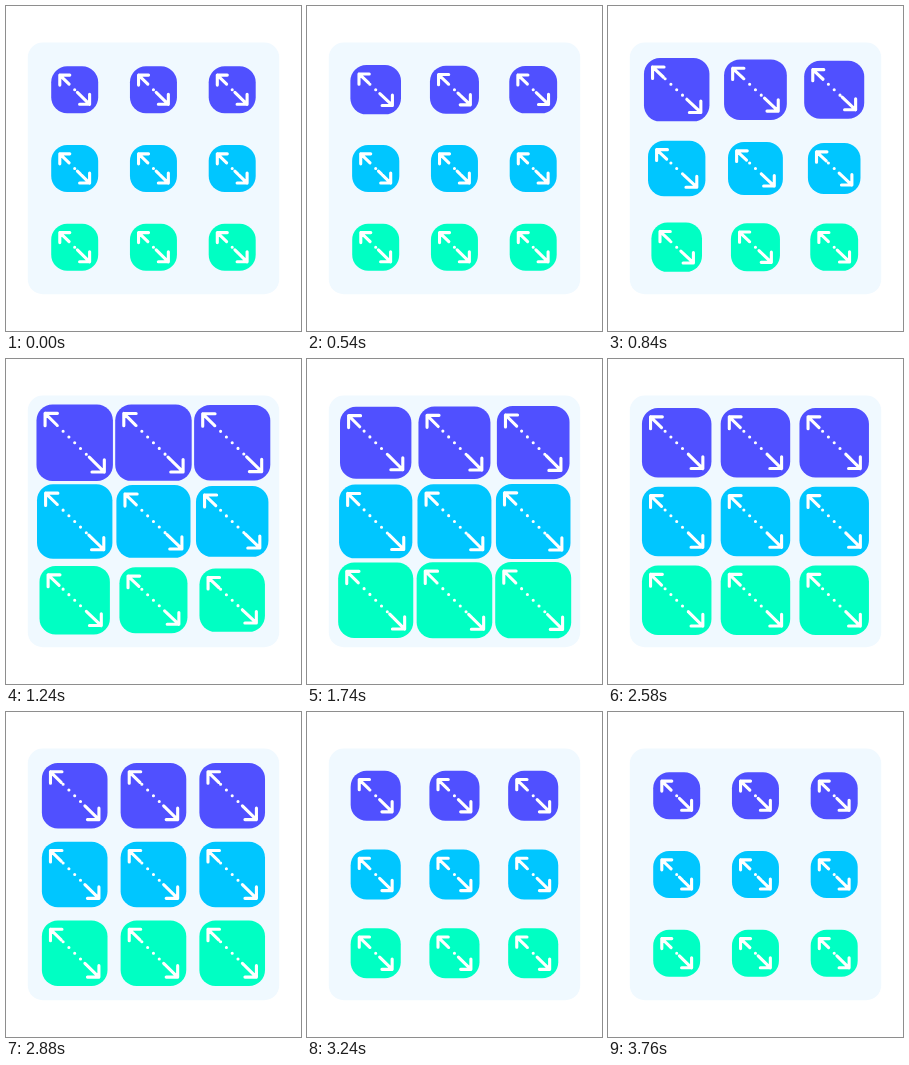
An HTML page for the animation above (3.78 s loop, 295 by 325 pixels).

```html
<!DOCTYPE html>
<html lang="en">
<head>
<meta charset="utf-8">
<title>Resizing tiles</title>
<style>
html, body { margin: 0; width: 100%; height: 100%; overflow: hidden; background: #fff; }
svg { display: block; width: 295px; height: 325px; }
path { fill: none; stroke: #fff; stroke-width: 3.1; stroke-linecap: round; stroke-linejoin: round; }
</style>
</head>
<body>
<svg id="stage" viewBox="0 0 295 325">
  <rect x="21.8" y="36.6" width="251.4" height="251.6" rx="15" fill="#f0f9ff"/>
</svg>
<script>
const LOOP = 3780, STAGGER = 50, LEAD = 18, LAG = 22;
const SMALL = 47, PEAK = 76.5, REST = 69.5;
const DOT_GAP = 5.8;
const COLORS = ['#5050ff', '#00c6ff', '#00ffc3'];
const stage = document.getElementById('stage');

function add(parent, tag, attrs = {}) {
  const node = document.createElementNS('http://www.w3.org/2000/svg', tag);
  for (const key in attrs) node.setAttribute(key, attrs[key]);
  return parent.appendChild(node);
}

const tiles = Array.from({ length: 9 }, (_, i) => {
  const col = i % 3, row = Math.floor(i / 3);
  const g = add(stage, 'g', { transform: `translate(${68.7 + col * 78.75} ${83.7 + row * 78.75})` });
  return { delay: i * STAGGER, box: add(g, 'rect', { rx: 16, fill: COLORS[row] }), icon: add(g, 'path') };
});

// Sine ease in and out between two times
function ease(t, start, end) {
  const x = Math.min(1, Math.max(0, (t - start) / (end - start)));
  return (1 - Math.cos(Math.PI * x)) / 2;
}

function sizeAt(t, delay) {
  const u = t - delay;
  return SMALL
    + (PEAK - SMALL) * ease(u, 366, 1214)
    + (REST - PEAK) * ease(u, 1214, 2050)
    + (SMALL - REST) * ease(t, 2680, 3420);
}

// Two corner arrows over a fixed dotted diagonal
function iconPath(w, h) {
  const x = w / 2 - 8.6, y = h / 2 - 8.9, slope = y / x;
  const arm = 10 + (w - SMALL) * 0.08;
  const arrow = (s, shaft) => {
    const end = s * (x - shaft);
    return `M${s * (x - arm)} ${s * y}H${s * x}V${s * (y - arm)}M${s * x} ${s * y}L${end} ${end * slope}`;
  };
  let d = arrow(-1, arm * 0.93) + arrow(1, arm * 1.22);
  for (let k = -3; k <= 3; k++) {
    const p = k * DOT_GAP;
    if (Math.abs(p) < x - arm * 0.9) d += `M${p} ${p * slope}h.01`;
  }
  return d;
}

function draw(now) {
  const t = now % LOOP;
  for (const { delay, box, icon } of tiles) {
    const w = sizeAt(t, delay - LEAD), h = sizeAt(t, delay + LAG);
    box.setAttribute('x', -w / 2);
    box.setAttribute('y', -h / 2);
    box.setAttribute('width', w);
    box.setAttribute('height', h);
    icon.setAttribute('d', iconPath(w, h));
  }
}

const begin = performance.now();
function tick() {
  draw(performance.now() - begin);
  requestAnimationFrame(tick);
}
tick();
</script>
</body>
</html>
```
